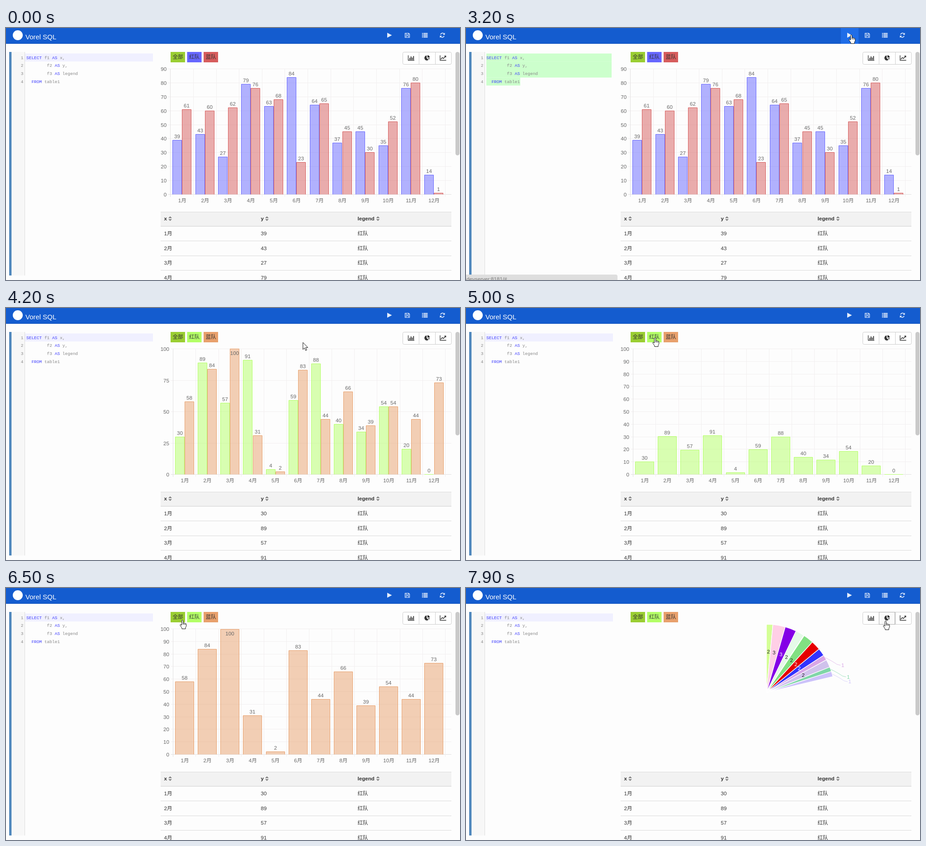
Write an HTML page that moves like this. It is 1004x558 px and loops after 8000 ms.

```html
<!DOCTYPE html>
<html lang="zh">
<head>
<meta charset="utf-8">
<title>SQL chart console</title>
<style>
html, body { margin: 0; width: 100%; height: 100%; overflow: hidden; background: #fdfdfd; }
svg { display: block; width: 1004px; height: 558px; font: 11.6px "Liberation Sans", "Noto Sans CJK SC", "Noto Sans CJK", sans-serif; }
.code { font: 9.5px "Liberation Mono", monospace; white-space: pre; fill: #888; }
.key { fill: #4040ff; }
</style>
</head>
<body>
<svg id="stage" viewBox="0 0 1004 558" xmlns="http://www.w3.org/2000/svg"></svg>
<script>
const LOOP = 8000, STEP = 100;
const RUN = 3350, RED = 4902, BLUE = 5740, ALL = 6650, PIE = 7842;
const BASE = 368.5, PLOT = 278, PLOT_END = 971.3;
const ROW = 17.7, CODE_X = 45, CODE_Y = 56.5, CODE_END = 322;

const before = {
  max: 90, step: 10, left: 363.9, colors: ['#6666ff', '#d65c5c'],
  rows: [[39, 43, 27, 79, 63, 84, 64, 37, 45, 35, 76, 14],
         [61, 60, 62, 76, 68, 23, 65, 45, 30, 52, 80, 1]]
};
const after = {
  max: 100, step: 25, left: 369.8, colors: ['#b3ff66', '#e8a06c'],
  rows: [[30, 89, 57, 91, 4, 59, 88, 40, 34, 54, 20, 0],
         [58, 84, 100, 31, 2, 83, 44, 66, 39, 54, 44, 73]]
};
const pieColors = ['#d4ff96', '#ffcfe6', '#8400e6', '#e6fae8', '#ffe0b0', '#82e082',
                   '#e60000', '#3333ff', '#d9a6e6', '#d0c2ec', '#80d6a8', '#ccc2fa'];

// Pointer moves: start, end, x, y
const moves = [
  [200, 1100, 106, 136], [1200, 1350, 119, 118], [1400, 1900, 39.5, 53],
  [2050, 2900, 925, 20], [2950, 3200, 852, 14.5], [3850, 4600, 418, 65.5],
  [5200, 5700, 452, 66], [5900, 6450, 390, 70.5], [6750, 7600, 928, 72.5]
];

const range = n => [...Array(n).keys()];
const mid = 'text-anchor="middle"', end = 'text-anchor="end"';
const rect = (x, y, w, h, fill, more = '') =>
  `<rect x="${x}" y="${y}" width="${w}" height="${h}" fill="${fill}" ${more}/>`;
const text = (s, x, y, fill, more = '') => `<text x="${x}" y="${y}" fill="${fill}" ${more}>${s}</text>`;
const stroke = (d, color, w = 1) => `<path d="${d}" fill="none" stroke="${color}" stroke-width="${w}"/>`;
const clamp = v => Math.max(0, Math.min(1, v));
const easeOut = p => 1 - (1 - clamp(p)) ** 4;
const snap = v => Math.floor(v) + .5;

// Clickable boxes: x, y, width, height
const nav = range(4).map(i => [829 + i * 39, 0, 39, 35]);
const chips = range(3).map(i => [364 + i * 36.5, 53, 32, 23]);
const views = range(3).map(i => [878 + i * 35.6, 53, 35.6, 28]);
const hit = ([px, py], [x, y, w, h]) => px >= x && px < x + w && py >= y && py < y + h;

// Each move follows a curve that sags in proportion to its length.
function pointer(t) {
  let x = 1010, y = 560;
  for (const [from, to, tx, ty] of moves) {
    if (t <= from) break;
    const p = clamp((t - from) / (to - from)), k = p * p * (3 - 2 * p);
    const sag = .09 * Math.hypot(tx - x, ty - y) * Math.sin(Math.PI * k);
    x += (tx - x) * k;
    y += (ty - y) * k + sag;
  }
  return [x, y];
}

function header(pos) {
  const ink = '#e4edfb';
  let s = rect(0, 0, 1004, 35, '#145ccf') + rect(0, 34, 1004, 1, '#1150b8');
  nav.filter(b => hit(pos, b)).forEach(b => s += rect(...b, '#1f6de8'));
  s += '<circle cx="26" cy="16" r="11" fill="#fff"/>' + text('Vorel SQL', 43, 25, '#fff', 'font-size="15"');
  s += `<path d="M843 10.500L853.500 16L843 21.500Z" fill="${ink}"/>`;
  s += stroke('M882.500 11.500h8l2 2v7.500h-10zM885 12v3h5v-3M885 21v-4h5v4', ink, 1.2);
  range(4).forEach(i => {
    const y = 11 + i * 2.8;
    s += rect(920, y, 2, 1.8, ink) + rect(923, y, 9.5, 1.8, ink);
  });
  s += stroke('M961 14.500a4.600 4.600 0 0 1 8 -1.500M969 17.500a4.600 4.600 0 0 1 -8 1.500', ink, 1.7);
  return s + `<path d="M970.500 10.500v4.500h-4.500zM959.500 21.500v-4.500h4.500z" fill="${ink}"/>`;
}

function selection([px, py]) {
  const row = Math.max(0, Math.floor((py - CODE_Y) / ROW));
  return range(4).filter(i => i >= row).map(i => {
    const x = i === row && py > CODE_Y ? Math.max(CODE_X, px) : CODE_X;
    return rect(x, CODE_Y + i * ROW, Math.max(0, (i === 3 ? 120 : CODE_END) - x), ROW + .1, '#ccffcc');
  }).join('');
}

function editor(t) {
  const drag = moves[2], selected = t >= drag[0] && t < RUN;
  let s = rect(7, 53, 5.5, 495, '#5088bd') + rect(12.5, 53, 28.5, 495, '#f7f7f7') + rect(41, 53, 1, 495, '#ddd');
  if (selected) s += selection(pointer(Math.min(t, drag[1])));
  else s += rect(42, CODE_Y, 283, ROW, '#f0f0ff');
  ['SELECT f1 AS x,', '        f2 AS y,', '        f3 AS legend', '  FROM table1'].forEach((src, i) => {
    const y = 68.5 + i * ROW;
    const marked = src.replace(/SELECT|AS|FROM/g, '<tspan class="key">$&</tspan>');
    s += text(marked, CODE_X, y, '#888', 'class="code" xml:space="preserve"');
    s += text(i + 1, 38.5, y, '#888', `class="code" ${end}`);
  });
  return s;
}

function controls(set, pos) {
  let s = '';
  chips.forEach((b, i) => {
    s += rect(...b, ['#9acd32', ...set.colors][i]);
    s += text(['全部', '红队', '蓝队'][i], b[0] + 16, 68.2, '#333', mid);
  });
  s += rect(877.5, 53.5, 107.5, 27, '#fff', 'rx="3" stroke="#ccc"');
  views.forEach((b, i) => {
    const x = snap(b[0]);
    if (i) s += stroke(`M${x} 54V80`, '#ccc');
    if (hit(pos, b)) s += rect(x, 53.5, 35, 27, '#fafafa', 'stroke="#adadad"');
  });
  s += stroke('M889.500 60.500v11h13.500M960 60.500v11h13.500', '#333', 1.3);
  s += stroke('M961.500 69l3.500 -3.500l2.500 2l4.500 -5M969.500 62h3v3', '#333', 1.6);
  range(4).forEach(i => {
    const h = 4 + i % 2 * 3 + i * .4;
    s += rect(892 + i * 2.8, 70.3 - h, 1.8, h, '#333');
  });
  return s + '<path d="M930.300 60.700v5.800l4.100 4.100a5.600 5.600 0 1 1 -4.100 -9.900zM932 60.300a5.600 5.600 0 0 1 5.200 5.200h-5.200zM932.800 66.900h4.200l-1.300 2.900z" fill="#333"/>';
}

function axes(set, step) {
  const { left, max } = set, pitch = (PLOT_END - left) / 12;
  const shade = first => first ? '#e2e0e0' : '#f2eff0';
  let s = '';
  for (let v = 0; v <= max; v += step) {
    const y = snap(BASE - v / max * PLOT);
    s += stroke(`M${left - 5.5} ${y}H985`, shade(!v)) + text(v, left - 8.8, y + 4, '#666', end);
  }
  range(13).forEach(i => {
    const x = left + i * pitch;
    s += stroke(`M${snap(x)} 90.500V374`, shade(!i));
    if (i < 12) s += text(i + 1 + '月', x + pitch / 2 + .6, 386.3, '#666', mid);
  });
  return s;
}

function bars(set, shown, p) {
  const w = shown.length > 1 ? 20 : 41, pitch = (PLOT_END - set.left) / 12;
  let s = '', labels = '';
  shown.forEach((k, n) => set.rows[k].forEach((v, i) => {
    const x = snap(set.left + pitch * i + 4.7 + n * 21.2);
    const top = snap(BASE - v / set.max * PLOT * p);
    const color = set.colors[k];
    s += rect(x, top, w, BASE - top, color, 'fill-opacity=".5"') + stroke(`M${x} ${BASE}V${top}h${w}V${BASE}`, color);
    labels += text(v, x + w / 2, top < 102 ? top + 13.5 : top - 4.8, '#666', mid);
  }));
  return s + labels;
}

function pie(p) {
  const cx = 664.4, cy = 231.3, r = 151;
  const vals = after.rows[0].map((v, i) => v + after.rows[1][i]);
  const sum = vals.reduce((a, b) => a + b);
  const at = (a, d) => [cx + Math.sin(a) * d, cy - Math.cos(a) * d];
  let a = 0, s = '', labels = '';
  vals.forEach((v, i) => {
    const color = pieColors[i], share = v / sum * p, size = share * 2 * Math.PI;
    s += `<path d="M${cx} ${cy}L${at(a, r)}A${r} ${r} 0 0 1 ${at(a + size, r)}Z" fill="${color}" stroke="#fff" stroke-width="1.300"/>`;
    const n = Math.round(share * 100), narrow = v < 80;
    const [x, y] = at(a + size / 2, narrow ? r : 90);
    a += size;
    if (!n) return;
    if (narrow) {
      labels += stroke(`M${x} ${y}q18 9 26 15l8 2`, color, .7) + text(n, x + 39, y + 21, color, mid);
    } else {
      const dark = color.includes('00e') || color.includes('0000') || color.includes('33');
      labels += text(n, x, y + 4, dark ? '#fff' : '#222', mid);
    }
  });
  return s + labels;
}

function chart(set, t) {
  if (t >= PIE) return pie(easeOut((t - PIE) / 1000));
  const both = [0, 1];
  const [start, shown] = [[ALL, both], [BLUE, [1]], [RED, [0]], [RUN, both], [-1000, both]].find(c => t >= c[0]);
  return axes(set, t > RED ? 10 : set.step) + bars(set, shown, easeOut((t - start) / 1000));
}

function table(set) {
  const col = i => 349.5 + i * 214, rule = (y, w = 1) => stroke(`M342 ${y}H985`, '#dadada', w);
  let s = rect(342, 407, 643, 32, '#f2f2f2') + rule(407.5) + rule(439, 1.6);
  ['x', 'y', 'legend'].forEach((name, i) => {
    const x = col(i) + 3.2 + name.length * 6.3;
    s += text(name, col(i), 426.3, '#333', 'font-weight="bold"');
    s += `<path d="M${x} 421h8l-4 -4zM${x} 423.200h8l-4 4z" fill="#808080"/>`;
  });
  range(4).forEach(i => {
    const y = 458.8 + i * 32.8;
    [i + 1 + '月', set.rows[0][i], '红队'].forEach((v, c) => s += text(v, col(c), y, '#333'));
    s += rule(snap(y + 12.5));
  });
  return s;
}

function cursor(t, pos) {
  if (t < 300) return '';
  let d = 'M0 0v15.500l3.500 -3.300l2.500 5.600l2.500 -1.100l-2.500 -5.400h5z', fill = '#fff';
  if ([...nav, ...chips, ...views].some(b => hit(pos, b))) {
    d = 'M-1.500 1.500q1.500 -2.300 3 0v5.500q1.500 -1 2.500 .5q1.500 -1 2.500 .8q2 -.8 2.200 1.700v4l-1.700 3v3h-8v-2l-4 -6q0 -2.500 2 -1.500l1.500 1.500zM1.500 7v3.500M4 8v3M6.500 9v2';
  } else if (hit(pos, [CODE_X, CODE_Y, 280, 85])) {
    d = 'M-3 -8h2l1 1l1 -1h2M0 -7v14M-3 8h2l1 -1l1 1h2';
    fill = 'none';
  }
  return `<path d="${d}" transform="translate(${pos})" stroke-linejoin="round" fill="${fill}" stroke="#111"/>`;
}

function status(t) {
  if (t < 3000 || t > 3900) return '';
  return rect(-4, 546, 339, 20, '#dedede', 'rx="4"') + text('devserver:8181/#', 1, 559.5, '#777');
}

const stage = document.getElementById('stage');
let last = -1;

function draw(now) {
  const t = Math.floor((now + 15) / STEP) * STEP % LOOP;
  if (t === last) return;
  last = t;
  const set = t < RUN ? before : after, pos = pointer(t);
  stage.innerHTML = rect(0, 0, 1004, 558, '#fdfdfd') + header(pos) + editor(t) +
    chart(set, t) + controls(set, pos) + table(set) +
    rect(994, 53, 9, 229, '#c9c9c9', 'rx="4.500"') + status(t) + cursor(t, pos);
}

const begin = performance.now();
(function tick() {
  draw(performance.now() - begin);
  requestAnimationFrame(tick);
})();
</script>
</body>
</html>
```
